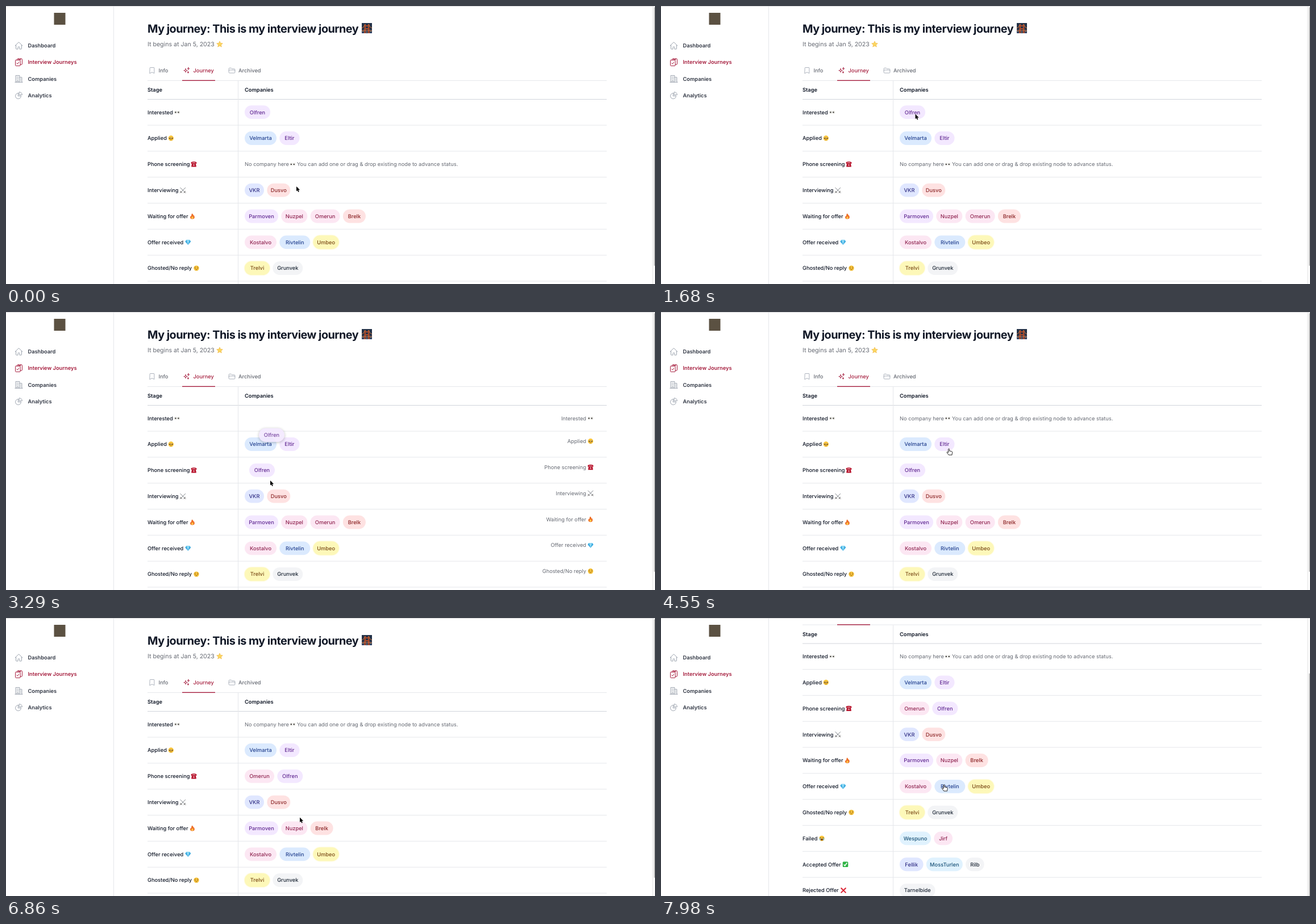
Write an HTML page that moves like this. It is 1142 px wide and 490 px high and loops after 8 s.

```html
<!DOCTYPE html>
<html lang="en">
<head>
<meta charset="utf-8">
<title>Interview journey board</title>
<style>
  html, body { margin: 0; width: 100%; height: 100%; overflow: hidden; background: #fff; }
  svg { display: block; }
  text { font: 500 9.28px Inter, "Liberation Sans", sans-serif; fill: #111827; text-rendering: geometricPrecision; white-space: pre; }
  .title { font-size: 19.8px; font-weight: 700; letter-spacing: -.025em; }
  .sub { font-size: 10.6px; font-weight: 400; fill: #666a73; }
  .semi { font-weight: 600; }
  .nav { font-weight: 600; fill: #303643; }
  .muted { font-weight: 400; fill: #666a73; }
  .tab { fill: #666a73; }
  .on { fill: #a51d3d; }
  .icon { fill: none; stroke: #9ca3af; stroke-width: 1.5; stroke-linecap: round; stroke-linejoin: round; }
  .icon.hot { stroke: #a51d3d; }
  .yellow { filter: drop-shadow(0 0 1px #fdf3a0); }
  .ghost { opacity: .86; filter: drop-shadow(0 1.5px 2.5px rgba(0, 0, 0, .3)); }
</style>
</head>
<body>
<svg id="stage" width="1142" height="490" viewBox="0 0 1142 490">
  <defs>
    <g id="eyes">
      <g fill="#f7f7f2" stroke="#c9c9c4" stroke-width=".4"><ellipse cx="-2.5" rx="2" ry="2.6"/><ellipse cx="2.5" rx="2" ry="2.6"/></g>
      <g fill="#24211f"><circle cx="-2.9" cy=".2" r="1.15"/><circle cx="2.1" cy=".2" r="1.15"/></g>
    </g>
    <circle id="face" r="4.7" fill="#f9c53b"/>
    <g id="moved">
      <use href="#face"/>
      <g fill="#4a2c14"><circle cx="-2" cy="0" r="1.25"/><circle cx="2" cy="0" r="1.25"/></g>
      <g fill="#fff"><circle cx="-2.3" cy="-.5" r=".6"/><circle cx="1.7" cy="-.5" r=".6"/></g>
      <path d="M-1.2 2.8Q0 2.1 1.2 2.8" fill="none" stroke="#6b3d12" stroke-width=".7"/>
    </g>
    <g id="phone" fill="#b8142d">
      <path d="M-5 -2.2Q-5 -4.6 0 -4.6T5 -2.2V-1H2.6V-2.6H-2.6V-1H-5Z"/>
      <path d="M-3.4 -1.8H3.4L4.4 4.6H-4.4Z"/><circle cy="1.5" r="1.4" fill="#e3a4ad"/>
    </g>
    <g id="swords" fill="none" stroke-linecap="round">
      <path d="M-4.4 -4.4L3.4 3.4M4.4 -4.4L-3.4 3.4" stroke="#7d8288" stroke-width="1"/>
      <path d="M-4.4 1.8L-1.8 4.4M4.4 1.8L1.8 4.4M3.4 3.4L4.6 4.6M-3.4 3.4L-4.6 4.6" stroke="#3f3c3a" stroke-width=".9"/>
    </g>
    <g id="fire">
      <path d="M-.6 -5Q1.8 -3 2 -.8L2.9 -1.8Q5.6 4.8 0 5Q-5.6 4.8 -3.4 -.6L-2.2 .4Q-1.9 -3 -.6 -5Z" fill="#ee6c25"/>
      <path d="M.2 -.4Q3 3.6 .1 4.6Q-3 3.8 -1.4 1.4L-.5 1.9Z" fill="#fcd34d"/>
    </g>
    <g id="gem">
      <path d="M-3 -4H3L5 -1 0 4.8 -5 -1Z" fill="#35a7de"/>
      <path d="M-3 -4L-1.8 -1H1.8L3 -4ZM-1.8 -1L0 4.8 1.8 -1Z" fill="#8bd8f5"/>
    </g>
    <g id="sad">
      <use href="#face"/>
      <path d="M-3.2 -.2Q-2 .9 -.9 0M.9 0Q2 .9 3.2 -.2M-1.4 2.8Q0 1.8 1.4 2.8M-3.2 -1.7L-1.3 -2.3M3.2 -1.7L1.3 -2.3" fill="none" stroke="#6b3d12" stroke-width=".7"/>
    </g>
    <g id="tears">
      <use href="#face"/>
      <path d="M-3.2 -1.2L-.9 -.9M3.2 -1.2L.9 -.9" stroke="#5b3412" stroke-width=".8"/>
      <ellipse cy="2.2" rx="2" ry="1.4" fill="#6b2f16"/>
      <path d="M-3.1 -.5V3.4M3.1 -.5V3.4" stroke="#55b5ec" stroke-width="1.3"/>
    </g>
    <g id="check">
      <rect x="-4.8" y="-4.8" width="9.6" height="9.6" rx="1.6" fill="#2fb344"/>
      <path d="M-2.7 .3L-.9 2.4 2.8 -2.8" fill="none" stroke="#fff" stroke-width="1.6"/>
    </g>
    <path id="cross" d="M-3.8 -3.8L3.8 3.8M3.8 -3.8L-3.8 3.8" stroke="#dc2434" stroke-width="2.1" stroke-linecap="round"/>
    <path id="star" d="M0 -5.2L1.6 -1.8 5.3 -1.4 2.5 1.1 3.3 4.8 0 2.9 -3.3 4.8 -2.5 1.1 -5.3 -1.4 -1.6 -1.8Z" fill="#fbd65f" stroke="#eeb13a" stroke-width=".6"/>
    <g id="bridge">
      <rect x="-9" y="-9" width="18" height="18" fill="#243248"/>
      <path d="M-9 3H9V9H-9Z" fill="#263a63"/>
      <path d="M-4.2 -7H-2V9H-5ZM2 -7H4.2L5 9H2ZM-4 -5H4V-3H-4ZM-4 0H4V2H-4Z" fill="#a64a2c"/>
      <path d="M-9 0Q-5 -1 -3 -7M9 0Q5 -1 3 -7M-9 4H9" fill="none" stroke="#d9783c" stroke-width="1"/>
      <path d="M-8 6H-6M-1 7H1M6 6H8" stroke="#e9b44c"/>
    </g>
    <path id="arrow" d="M0 0V8.6L1.9 6.9 3.3 9.9 4.8 9.2 3.4 6.3H6.2Z" stroke="#fff" stroke-width=".8" paint-order="stroke"/>
    <path id="hand" d="M-1 1.2C-1 -.3 1 -.3 1 1.2V4.2L2.2 4 5 4.8Q6.4 5.1 6.2 6.6L5.6 9.4V11H-.2L-3.2 7C-4 6 -2.9 5.2 -2.1 5.9L-1 6.8Z" fill="#fff" stroke="#111" stroke-width=".9" stroke-linejoin="round"/>
  </defs>
  <rect width="1142" height="490" fill="#fff"/>
  <g id="page"><g id="fixed"></g><g id="board"></g></g>
  <g id="side"></g>
  <rect id="thumb" x="1140" y="2" width="2" height="456" rx="1" fill="#c1c1c1"/>
  <rect width="1142" height="1" fill="#d6d6d8"/>
  <g id="pointer"></g>
</svg>
<script>
const LOOP = 8000, STEP = 70, LEFT = 420, GAP = 5.3, ROW = 45.82, FIRST = 187.2;
const $ = id => document.getElementById(id);

const COLORS = {
  purple: ['#f3e8ff', '#622a92'], blue: ['#dbeafe', '#23418f'], indigo: ['#e0e7ff', '#333186'],
  red: ['#fee2e2', '#8b2526'], pink: ['#fce7f3', '#8f2450'], yellow: ['#fdf8b9', '#7a4a17'],
  gray: ['#f3f4f6', '#1f2937'], sky: ['#e0f2fe', '#1c5579']
};
const chip = (name, width, color) => ({ name, width, color });
const HOME = chip('Olfren', 45, 'purple'), SHOP = chip('Omerun', 52, 'pink');

// label, emoji, emoji centre x, chips
const STAGES = [
  ['Interested', 'eyes', 301.3, []],
  ['Applied', 'moved', 290.3, [chip('Velmarta', 56, 'blue'), chip('Eltir', 35.2, 'purple')]],
  ['Phone screening', 'phone', 330.5, []],
  ['Interviewing', 'swords', 311.2, [chip('VKR', 34, 'indigo'), chip('Dusvo', 41, 'red')]],
  ['Waiting for offer', 'fire', 328, [chip('Parmoven', 59, 'purple'), chip('Nuzpel', 46, 'pink'), chip('Brelk', 40, 'red')]],
  ['Offer received', 'gem', 320.3, [chip('Kostalvo', 56, 'pink'), chip('Rivtelin', 54, 'blue'), chip('Umbeo', 45, 'yellow')]],
  ['Ghosted/No reply', 'sad', 335, [chip('Trelvi', 44, 'yellow'), chip('Grunvek', 53, 'gray')]],
  ['Failed', 'tears', 283, [chip('Wespuno', 55, 'sky'), chip('Jirf', 32.7, 'pink')]],
  ['Accepted Offer', 'check', 324.5, [chip('Fellik', 41.5, 'indigo'), chip('MossTurlen', 64, 'sky'), chip('Rilb', 32.5, 'gray')]],
  ['Rejected Offer', 'cross', 321, [chip('Tarnelbide', 62.5, 'gray')]]
];

// time, x, y
const CURSOR = [
  [0, 511, 318], [630, 511, 318], [1400, 453, 195], [1680, 447.5, 190.5], [2100, 450, 195],
  [2240, 450, 195], [2870, 470, 215], [3010, 473, 222], [3290, 465, 297], [3640, 466, 303],
  [3850, 466, 303], [4550, 506.5, 241], [4690, 511, 250], [4970, 556, 368], [5040, 556, 368],
  [5460, 541.5, 281], [5670, 541.5, 281], [6440, 538, 262], [6860, 517, 351.5],
  [7000, 517, 351.5], [7770, 498, 294]
];
const GHOST_HOME = [[2240, 442.5, 187.2], [2870, 460, 205], [3290, 467.5, 217], [3570, 442.5, 278.8]];
const GHOST_SHOP = [[5040, 561.6, 370.5], [5460, 546.5, 282.5], [5670, 546.5, 282.5], [5950, 497, 278.8]];
const SCROLL = [[0, 0], [280, 0], [420, 10], [560, 10], [910, 119.5], [980, 119.5], [1400, 0], [6930, 0], [7770, 119.5]];
const SLIDE = [[3220, 12], [3290, 8], [3500, 0]];

const within = (t, from, to) => t >= from && t < to;

function at(keys, t) {
  const next = keys.findIndex(k => k[0] > t);
  if (next < 0) return keys.at(-1).slice(1);
  if (next === 0) return keys[0].slice(1);
  const a = keys[next - 1], b = keys[next];
  const p = (t - a[0]) / (b[0] - a[0]), e = p * p * (3 - 2 * p);
  return a.slice(1).map((v, i) => v + (b[i + 1] - v) * e);
}

const text = (x, y, str, cls = '', extra = '') => `<text x="${x}" y="${y + 3.35}" class="${cls}" ${extra}>${str}</text>`;
const use = (id, x, y) => `<use href="#${id}" x="${x}" y="${y}"/>`;
const line = (x1, y1, x2, y2, color = '#e5e7eb') => `<path d="M${x1} ${y1}L${x2} ${y2}" stroke="${color}"/>`;
const icon = (d, x, y, size, hot) =>
  `<path class="icon ${hot ? 'hot' : ''}" d="${d}" transform="translate(${x - size / 2} ${y - size / 2}) scale(${size / 24})"/>`;
const rowY = i => FIRST + i * ROW;

function pill({ name, width, color }, cx, cy, cls = '') {
  const [fill, ink] = COLORS[color];
  return `<g class="${cls}"><rect class="${color}" x="${cx - width / 2}" y="${cy - 11.9}" width="${width}" height="23.8" rx="11.9" fill="${fill}"/>` +
    text(cx, cy, name, '', `text-anchor="middle" style="fill:${ink}"`) + '</g>';
}

function drawFixed() {
  const nav = [
    ['Dashboard', 'M2.3 12L11.2 3.1Q12 2.4 12.8 3.1L21.7 12M4.5 9.8V20Q4.5 21 5.6 21H9.8V16Q9.8 15 10.9 15H13.1Q14.2 15 14.2 16V21H18.4Q19.5 21 19.5 20V9.8'],
    ['Interview Journeys', 'M8 6V4Q8 2.5 9.5 2.5H19Q21 2.5 21 4.5V16Q21 18 19 18H16M4.5 6H14.5Q16 6 16 7.5V20Q16 21.5 14.5 21.5H4.5Q3 21.5 3 20V7.5Q3 6 4.5 6M6.5 14.5L8.5 16.5 12.5 11.5M11.5 2.5V5H17V2.5'],
    ['Companies', 'M2 21H22M3.8 21V3H14.2V21M14.2 8H20.2V21M7 6.8H8M10 6.8H11M7 10H8M10 10H11M7 13.2H8M10 13.2H11M7 21V17H11V21M17 11.5H17.5M17 14.5H17.5M17 17.5H17.5'],
    ['Analytics', 'M10.5 6A7.5 7.5 0 1 0 18 13.5H10.5ZM13.5 10.5H21A7.5 7.5 0 0 0 13.5 3Z']
  ];
  $('side').innerHTML = '<rect width="189" height="490" fill="#fff"/>' + line(189.5, 0, 189.5, 490) +
    '<rect x="84.5" y="12" width="20" height="21" fill="#5b5142"/>' +
    nav.map(([label, d], i) => icon(d, 22.5, 70 + i * 29.2, 15.84, i === 1) +
      text(38.5, 69.8 + i * 29.2, label, i === 1 ? 'nav on' : 'nav')).join('') +
    '<rect x="1137" width="5" height="490" fill="#fafafa"/>' + line(1137.5, 0, 1137.5, 490, '#e8e8e8');

  const bookmark = 'M5 3.5Q5 2.5 6.5 2.5H17.5Q19 2.5 19 3.5V21L12 17.5 5 21Z';
  const sparkles = 'M9 6L10.3 10.6 15 12 10.3 13.4 9 18 7.7 13.4 3 12 7.7 10.6ZM18 2.5L18.8 5.2 21.5 6 18.8 6.8 18 9.5 17.2 6.8 14.5 6 17.2 5.2ZM17 15.5L17.5 17.5 19.5 18 17.5 18.5 17 20.5 16.5 18.5 14.5 18 16.5 17.5Z';
  const folder = 'M2.3 12.8V6Q2.3 4 4.3 4H9.5L12.5 6.7H19.5Q21.7 6.7 21.7 9V18Q21.7 20 19.5 20H4.5Q2.3 20 2.3 18V12.8Q2.3 10.5 4.5 10.5H19.5Q21.7 10.5 21.7 12.8';
  $('fixed').innerHTML =
    '<text x="249" y="46.5" class="title">My journey: This is my interview journey</text>' + use('bridge', 635, 39) +
    '<text x="249" y="71" class="sub">It begins at Jan 5, 2023</text>' + use('star', 376, 67.3) +
    icon(bookmark, 257, 113.7, 13.2) + text(268.5, 113.6, 'Info', 'tab') +
    icon(sparkles, 317.7, 113.7, 13.2, true) + text(329.5, 113.6, 'Journey', 'on') +
    icon(folder, 397.5, 113.7, 13.2) + text(409, 113.6, 'Archived', 'tab') +
    line(249, 131.5, 1057, 131.5) + '<rect x="310" y="130.6" width="58" height="1.4" fill="#a51d3d"/>' +
    text(249, 148, 'Stage', 'semi') + text(LEFT, 148, 'Companies', 'semi') +
    line(249, 164.5, 1057, 164.5, '#d1d5db') + line(408.5, 132, 408.5, 640) +
    STAGES.map(([label, emoji, x], i) => text(249, rowY(i), label) + use(emoji, x, rowY(i)) +
      line(249, rowY(i) + 22.9, 1057, rowY(i) + 22.9)).join('');
}

// Chips of every stage at time t
function placeChips(t) {
  const rows = STAGES.map(s => [...s[3]]);
  if (t < 3220) rows[0].push(HOME); else rows[2].push(HOME);
  if (t < 5250) rows[4].splice(2, 0, SHOP);
  else if (t < 5390) rows[3].push(SHOP);
  else if (t < 6230) rows[2].push(SHOP);
  else rows[2].unshift(SHOP);
  return rows;
}

function drawBoard(t) {
  const dragHome = within(t, 2240, 3640), dragShop = within(t, 5110, 5950);
  const dragging = dragHome || dragShop;
  let out = '';
  placeChips(t).forEach((chips, i) => {
    const y = rowY(i);
    let x = LEFT;
    for (const c of chips) {
      const shift = c === HOME && within(t, 3220, 3500) ? at(SLIDE, t)[0] : 0;
      out += pill(c, x + c.width / 2 + shift, y);
      x += c.width + GAP;
    }
    if (dragging) {
      const labelY = y - (chips.length ? 5.3 : 0);
      out += text(1021, labelY, STAGES[i][0], 'muted', 'text-anchor="end"') + use(STAGES[i][1], 1028.6, labelY);
    } else if (!chips.length) {
      out += text(LEFT, y, 'No company here', 'muted') + use('eyes', 504.7, y) +
        text(512, y, 'You can add one or drag &amp; drop existing node to advance status.', 'muted');
    }
  });
  if (within(t, 2240, 3570)) out += pill(HOME, ...at(GHOST_HOME, t), 'ghost');
  if (dragShop) out += pill(SHOP, ...at(GHOST_SHOP, t), 'ghost');
  $('board').innerHTML = out;
}

function drawPointer(t) {
  const [x, y] = at(CURSOR, t);
  const pressed = within(t, 1960, 3220) || within(t, 5000, 5670);
  const hand = within(t, 4410, 4760) || t >= 7840;
  $('pointer').innerHTML = use(hand ? 'hand' : 'arrow', x, y) +
    (pressed ? `<circle cx="${x}" cy="${y}" r="14.2" fill="none" stroke="#111" stroke-width="1.3"/>` : '');
}

let shown = -1;
function frame() {
  const t = Math.floor(performance.now() % LOOP / STEP) * STEP;
  if (t !== shown) {
    shown = t;
    const [scroll] = at(SCROLL, t);
    $('page').setAttribute('transform', `translate(0 ${-scroll})`);
    $('thumb').setAttribute('y', 2 + scroll * .8);
    drawBoard(t);
    drawPointer(t);
  }
  requestAnimationFrame(frame);
}

drawFixed();
frame();
</script>
</body>
</html>
```
